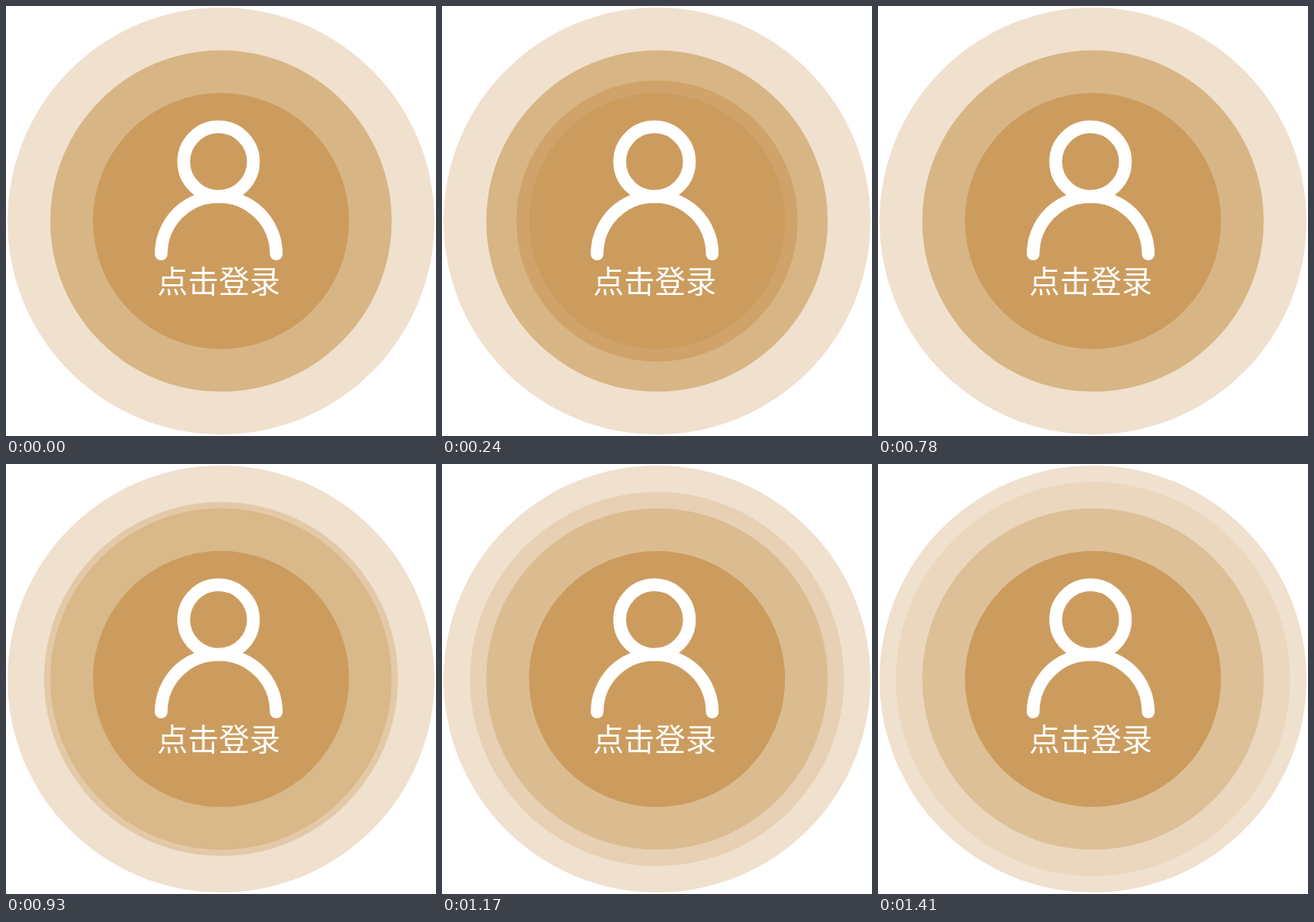
Recreate the animation shown at these times as an HTML page. Size 558x558 px, loop 1770 ms.

```html
<!DOCTYPE html>
<html lang="zh-CN">
<head>
<meta charset="utf-8">
<title>点击登录</title>
<style>
  html, body { margin: 0; width: 100%; height: 100%; overflow: hidden; background: #fff; }
  svg { display: block; width: 100vw; height: 100vh; }
  text { font: 500 40px KaiTi, STKaiti, "Noto Sans CJK SC", "Noto Sans CJK", sans-serif; fill: #fff; }
  .icon { fill: none; stroke: #fff; stroke-width: 16.6; stroke-linecap: round; }
</style>
</head>
<body>
<svg viewBox="0 0 558 558">
  <circle cx="279" cy="279" r="277" fill="#f0e0ce"/>
  <circle id="wide" cx="279" cy="279" r="221.5"/>
  <circle id="mid" cx="279" cy="279" r="221.5"/>
  <circle id="near" cx="279" cy="279" r="166" fill="#cc9c5e"/>
  <circle cx="279" cy="279" r="166" fill="#cc9c5e"/>
  <g class="icon">
    <circle cx="275.8" cy="202" r="45.2"/>
    <path d="M201.3 321.8a74.7 74.7 0 0 1 149.4 0"/>
  </g>
  <text x="196" y="372">点击登录</text>
</svg>
<script>
  const LOOP = 1770, STEP = 30, SECOND = 780;
  const [wide, mid, near] = ["wide", "mid", "near"].map(id => document.getElementById(id));
  const mix = (a, b, p) => `rgb(${a.map((v, i) => Math.round(v + (b[i] - v) * p))})`;

  function draw(ms) {
    const t = Math.floor((ms % LOOP) / STEP) * STEP;

    // Inner ripple: heads for the middle disc, stops partway
    const a = t < SECOND ? Math.min(t / STEP, 15) / 27 : 0;
    near.setAttribute("r", 166 + 55.5 * a);
    near.setAttribute("opacity", 1 - a);

    // Outer ripple: the middle disc lightens as it spreads
    const k = t < SECOND ? 0 : Math.min((t - SECOND) / STEP, 21);
    const p = k / 21;
    wide.setAttribute("r", 221.5 + 55.5 * k / 34);
    wide.setAttribute("fill", mix([225, 197, 160], [234, 215, 190], p));
    wide.setAttribute("visibility", k ? "visible" : "hidden");
    mid.setAttribute("fill", mix([216, 181, 133], [221, 192, 151], p));
  }

  const start = performance.now();
  function tick() {
    draw(performance.now() - start);
    requestAnimationFrame(tick);
  }
  tick();
</script>
</body>
</html>
```
